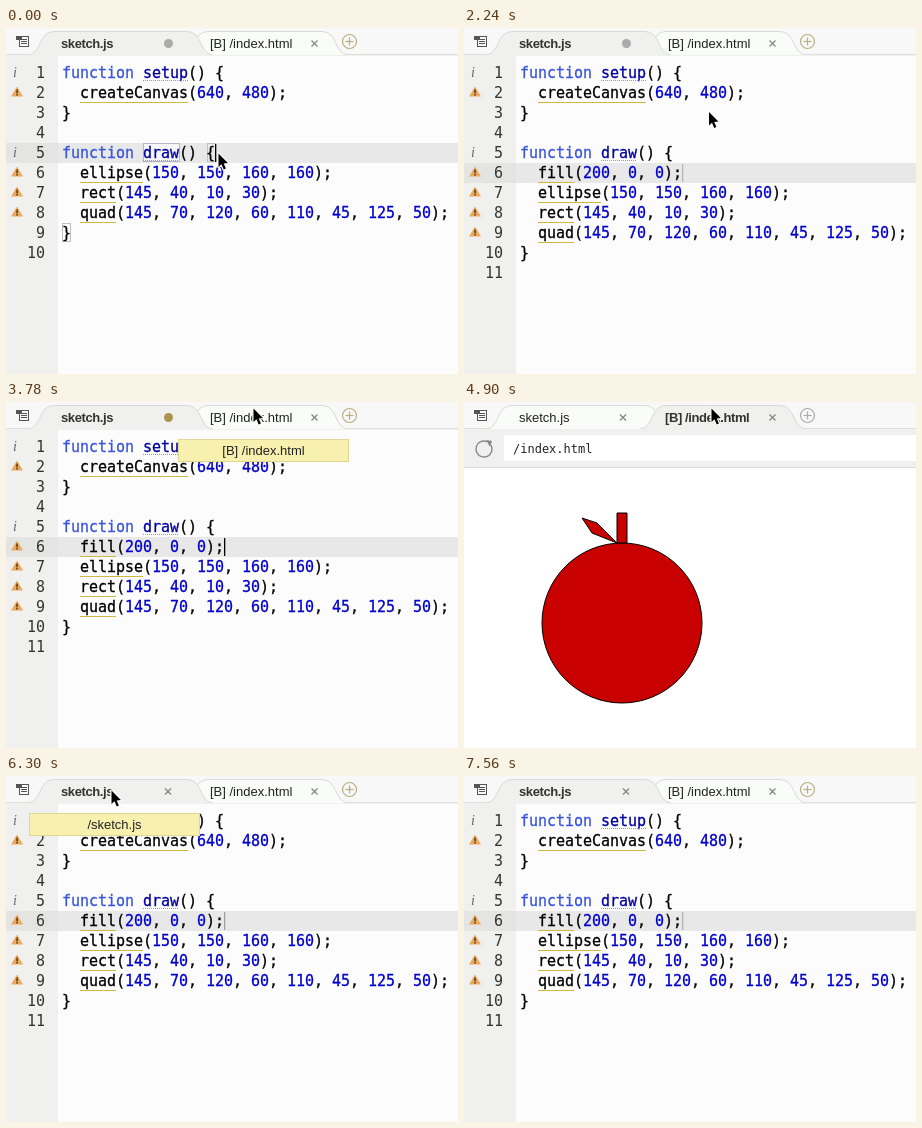
Recreate the animation shown at these times as an HTML page with a canvas. Size 452 by 346 pixels, loop 7.73 s.

```html
<!DOCTYPE html>
<html lang="en">
<head>
<meta charset="utf-8">
<title>Editor and preview</title>
<style>
html, body { margin: 0; width: 100%; height: 100%; overflow: hidden; background: #fcfcfc; }
canvas { display: block; }
</style>
</head>
<body>
<canvas id="stage" width="452" height="346"></canvas>
<script>
const ctx = document.getElementById('stage').getContext('2d');
const LOOP = 7730, STEP = 140, CHAR = 9, LEFT = 56;
const MONO = '"DejaVu Sans Mono", monospace';
const SANS = '"Liberation Sans", Arial, sans-serif';
const CODE = `15px ${MONO}`;

// What line 6 holds, from each time on
const typing = [[420, '  '], [560, '  fill()'], [1120, '  fill(200, )'], [1260, '  fill(200, 0, 0)'], [1400, '  fill(200, 0, 0);']];
// Pointer: time, x, y
const path = [[0, 212, 125], [1820, 212, 125], [2660, 277, 42], [2940, 279, 31], [3500, 247, 6],
  [4900, 247, 6], [5880, 105, 14], [6580, 105, 14], [7420, 230, 320], [7560, 245, 360]];

function rect(x, y, w, h, color) {
  ctx.fillStyle = color;
  ctx.fillRect(x, y, w, h);
}

function frame(x, y, w, h, color) {
  ctx.strokeStyle = color;
  ctx.lineWidth = 1;
  ctx.strokeRect(x + .5, y + .5, w, h);
}

function text(str, x, y, font, color, align = 'left', spacing = 0) {
  ctx.font = font;
  ctx.fillStyle = color;
  ctx.textAlign = align;
  ctx.letterSpacing = spacing + 'px';
  ctx.fillText(str, x, y);
}

// Editor text, thickened slightly
function code(str, x, y, color) {
  text(str, x, y, CODE, color, 'left', -.03);
  ctx.strokeStyle = color;
  ctx.lineWidth = .3;
  ctx.strokeText(str, x, y);
}

function shape(points, fill, stroke, width = 1) {
  ctx.beginPath();
  points.forEach(([x, y]) => ctx.lineTo(x, y));
  ctx.closePath();
  paint(fill, stroke, width);
}

function circle(x, y, r, fill, stroke, width = 1) {
  ctx.beginPath();
  ctx.arc(x, y, r, 0, 7);
  paint(fill, stroke, width);
}

function paint(fill, stroke, width) {
  ctx.lineWidth = width;
  if (fill) { ctx.fillStyle = fill; ctx.fill(); }
  if (stroke) { ctx.strokeStyle = stroke; ctx.stroke(); }
}

function line(x1, y1, x2, y2, color, width = 1) {
  ctx.beginPath();
  ctx.moveTo(x1, y1);
  ctx.lineTo(x2, y2);
  paint(null, color, width);
}

function tab(x, end, active) {
  ctx.beginPath();
  ctx.moveTo(x, 27);
  ctx.bezierCurveTo(x + 14, 26, x + 10, 3.5, x + 26, 3.5);
  ctx.lineTo(end - 26, 3.5);
  ctx.bezierCurveTo(end - 10, 3.5, end - 14, 26, end, 27);
  paint(active ? '#f0f0ee' : '#fafcfa', '#d9d9d7', 1);
}

function label(str, x, active) {
  if (active) text(str, x, 20, `bold 13px ${SANS}`, '#333', 'left', -.4);
  else text(str, x, 20, `13px ${SANS}`, '#222');
}

function cross(x) {
  line(x - 3, 12.5, x + 3, 18.5, '#858585', 1.2);
  line(x + 3, 12.5, x - 3, 18.5, '#858585', 1.2);
}

function tabs(preview, tip, dirty) {
  rect(0, 0, 452, 28, '#f8f8f8');
  line(0, 26.5, 452, 26.5, '#dededc');
  const first = () => tab(22, 207, !preview), second = () => tab(176, 342, preview);
  (preview ? [first, second] : [second, first]).forEach(draw => draw());
  rect(0, 27, 452, 1, '#f0f0ee');

  label('sketch.js', 55, !preview);
  label('[B] /index.html', preview ? 201 : 204, preview);
  if (dirty) circle(162.5, 15.5, 4.5, tip ? '#a8964e' : '#aaa');
  else cross(preview ? 159 : 162);
  cross(308.5);

  const plus = preview ? '#aaa' : '#b9ae80';
  circle(343.5, 13.5, 7, null, plus, 1.2);
  line(339.5, 13.5, 347.5, 13.5, plus, 1.2);
  line(343.5, 9.5, 343.5, 17.5, plus, 1.2);

  frame(13, 8, 9, 10, '#555');
  rect(10, 8, 6, 4, '#555');
  for (const y of [11, 13, 15]) rect(15, y, 6, 1, '#555');
}

function codeLine(str, y) {
  const parts = str.matchAll(/(function )(\w+)|\d+|[^\d]+?(?=\d|$)/g);
  for (const part of parts) {
    const x = LEFT + part.index * CHAR;
    if (part[1]) {
      code(part[1], x, y, '#3a55dc');
      code(part[2], x + 9 * CHAR, y, '#0000a2');
      ctx.setLineDash([1, 1]);
      line(x + 9 * CHAR, y + 2.5, x + (9 + part[2].length) * CHAR, y + 2.5, '#999');
      ctx.setLineDash([]);
    } else code(part[0], x, y, /\d/.test(part[0]) ? '#0000cd' : '#000');
  }
}

function warning(top) {
  shape([[11, top + 3.5], [17, top + 13.5], [5, top + 13.5]], '#e9a95f');
  rect(10.3, top + 6.5, 1.5, 3.8, '#5a3510');
  rect(10.3, top + 11, 1.5, 1.5, '#5a3510');
}

function editor(t) {
  const typed = typing.filter(([at]) => t >= at).pop();
  const lines = ['function setup() {', '  createCanvas(640, 480);', '}', '', 'function draw() {',
    '  ellipse(150, 150, 160, 160);', '  rect(145, 40, 10, 30);',
    '  quad(145, 70, 120, 60, 110, 45, 125, 50);', '}', ''];
  if (typed) lines.splice(5, 0, typed[1]);

  const current = typed ? 135 : 115;
  rect(0, 28, 452, 318, '#fcfcfc');
  rect(0, 28, 52, 318, '#f0f0ee');
  rect(0, current, 52, 20, '#e4e4e2');
  rect(52, current, 400, 20, '#e8e8e8');
  if (t < 1680) {
    rect(137, 115, 37, 19, '#f6f6fa');
    frame(137, 115, 36, 18, '#b5b5c8');
  }
  if (!typed) {
    frame(201, 115, 8, 18, '#c0c0c0');
    frame(56, 195, 8, 18, '#c0c0c0');
  }

  lines.forEach((str, i) => {
    const top = 35 + i * 20;
    text(i + 1, 39, top + 15, CODE, '#333', 'right');
    codeLine(str, top + 15);
    const call = str.match(/^  (\w+)\(/);
    if (/^function/.test(str)) text('i', 7, top + 14, 'italic 14px "Liberation Serif", serif', '#666');
    else if (call && (call[1] !== 'fill' || t >= 1680)) {
      warning(top);
      rect(LEFT + 2 * CHAR, top + 19, call[1].length * CHAR, 1, '#cfb83c');
    }
  });

  const inner = typed && typed[1].endsWith(')') && t < 1260 ? 1 : 0;
  const column = typed ? typed[1].length - inner : 17;
  ctx.globalAlpha = t < 1680 ? 1 : .6 + .4 * Math.cos((t - 3780) / 1060 * 2 * Math.PI);
  rect(LEFT + column * CHAR, current + 1, 1.3, 18, '#000');
  ctx.globalAlpha = 1;
}

function preview() {
  rect(0, 28, 452, 318, '#fff');
  rect(0, 28, 452, 37, '#f0f0f0');
  rect(0, 65, 452, 1, '#dcdcdc');
  rect(40, 33, 412, 26, '#fff');
  text('/index.html', 49, 51, `12px ${MONO}`, '#222');
  ctx.beginPath();
  ctx.arc(20, 47, 8, -.5, 5.1);
  paint(null, '#888', 1.4);
  shape([[22, 38], [28, 39], [26, 45]], '#888');

  ctx.save();
  ctx.translate(8, 71);
  const red = '#c80000';
  circle(150, 150, 80, red, '#000');
  shape([[145, 40], [155, 40], [155, 70], [145, 70]], red, '#000');
  shape([[145, 70], [120, 60], [110, 45], [125, 50]], red, '#000');
  ctx.restore();
}

function tooltip(x, str) {
  rect(x, 37, 171, 23, '#f8f0ae');
  frame(x, 37, 170, 22, '#e0d890');
  text(str, x + 85.5, 53, `13px ${SANS}`, '#222', 'center');
}

function pointer(t) {
  const i = path.findIndex(([at]) => at > t);
  if (i < 0) return;
  const [t0, x0, y0] = path[i - 1], [t1, x1, y1] = path[i];
  const p = (t - t0) / (t1 - t0), e = p * p * (3 - 2 * p);
  ctx.save();
  ctx.translate(x0 + (x1 - x0) * e + .5, y0 + (y1 - y0) * e + .5);
  ctx.lineJoin = 'round';
  const arrow = [[0, 0], [0, 13.5], [3, 10.7], [5.2, 16], [7.4, 15], [5.2, 9.9], [9.4, 9.6]];
  shape(arrow, null, '#fff', 2.4);
  shape(arrow, '#000');
  ctx.restore();
}

function draw(now) {
  const t = Math.floor(now % LOOP / STEP) * STEP;
  const showPage = t >= 4060 && t < 6300;
  const pageTip = t >= 3640 && t < 4060;
  showPage ? preview() : editor(t);
  tabs(showPage, pageTip, t < 4060);
  if (pageTip) tooltip(172, '[B] /index.html');
  if (t >= 5880 && t < 6440) tooltip(23, '/sketch.js');
  pointer(t);
  requestAnimationFrame(draw);
}
requestAnimationFrame(draw);
</script>
</body>
</html>
```
